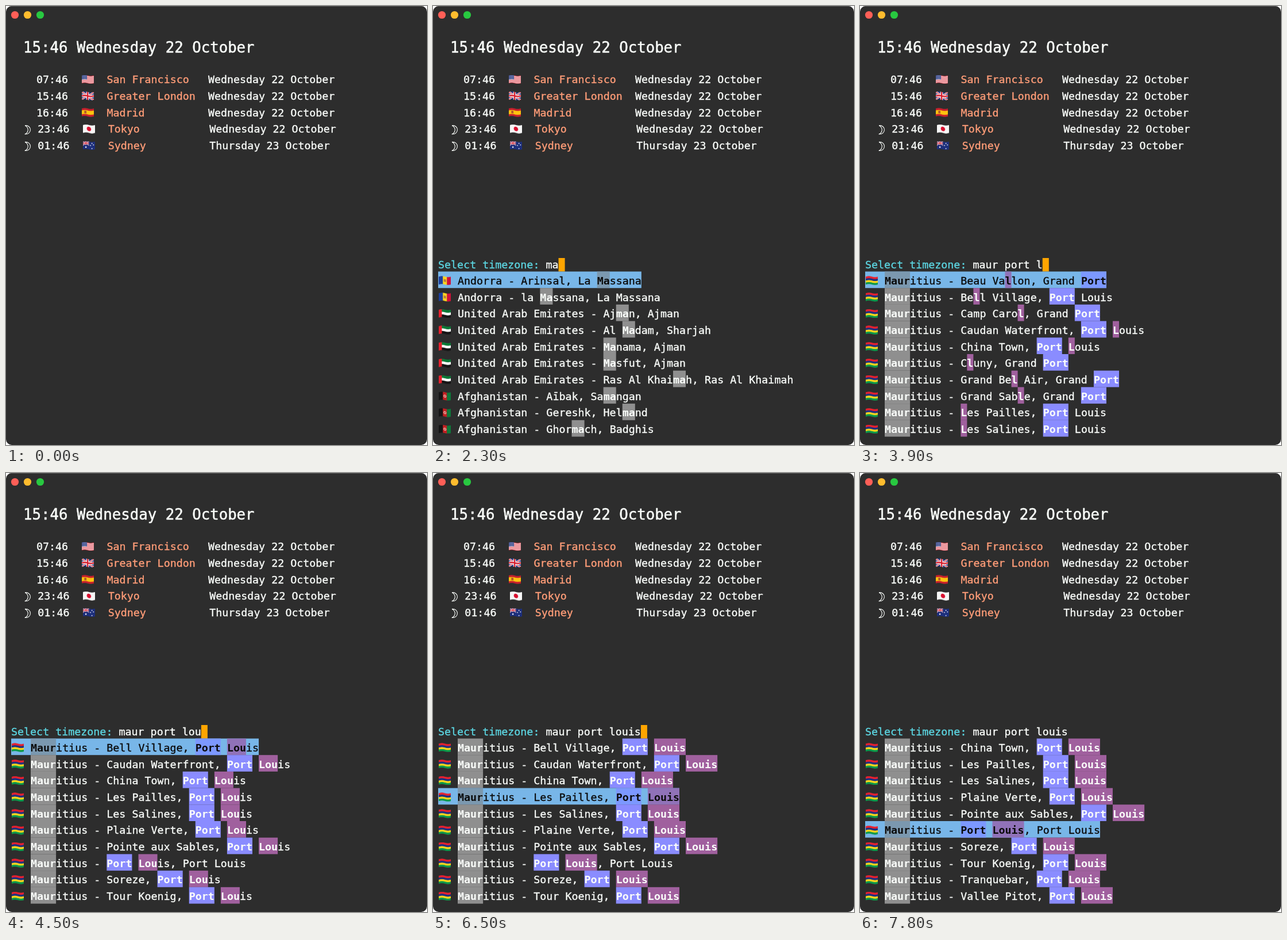
Write an HTML page with a canvas that moves like this. It is 733 px wide and 763 px high and loops after 8000 ms.

```html
<!DOCTYPE html>
<html lang="en">
<head>
<meta charset="utf-8">
<title>World clock</title>
<style>
  html, body { margin: 0; width: 100%; height: 100%; overflow: hidden; background: #fff; }
  canvas { display: block; width: 733px; height: 763px; }
</style>
</head>
<body>
<canvas id="stage"></canvas>
<script>
const W = 733, H = 763, LOOP = 8000;
const SIZE = 18.32, CELL = SIZE * 0.602, LINE = 28.7, ROWS = 10;
const LEFT = 9, TEXT_X = 43, LIST_Y = 461.5;
const FONT = '"DejaVu Sans Mono", "Noto Sans Mono", monospace';
const INK = '#fafdfa', CITY = '#ff9d78', PROMPT = '#5cd6e2';
const SELECTED = '#78b6e8', CURSOR = '#ffa500';
const MARK = ['#8f8f8f', '#8a8cff', '#a0609e'];
const MARK_SELECTED = ['#7b98af', '#7c98ff', '#9072b8'];
const LABEL = 'Select timezone: ';

const canvas = document.getElementById('stage');
const ctx = canvas.getContext('2d');
const ratio = window.devicePixelRatio || 1;
canvas.width = W * ratio;
canvas.height = H * ratio;

// Flags are painted on a 20 x 13 grid, then waved column by column.
const FW = 20, FH = 13, ZOOM = 4, FLAG_WIDTH = 21;

function box(g, color, x, y, w, h) {
  g.fillStyle = color;
  g.fillRect(x, y, w, h);
}
function disc(g, color, x, y, r) {
  g.fillStyle = color;
  g.beginPath();
  g.arc(x, y, r, 0, Math.PI * 2);
  g.fill();
}
function shape(g, color, points) {
  g.fillStyle = color;
  g.beginPath();
  points.forEach(([x, y]) => g.lineTo(x, y));
  g.fill();
}
function bars(g, ...colors) {
  const h = FH / colors.length;
  colors.forEach((c, i) => box(g, c, 0, i * h, FW, h));
}
function columns(g, ...colors) {
  const w = FW / colors.length;
  colors.forEach((c, i) => box(g, c, i * w, 0, w, FH));
}
function saltire(g, color, width) {
  g.strokeStyle = color;
  g.lineWidth = width;
  g.beginPath();
  g.moveTo(0, 0); g.lineTo(FW, FH);
  g.moveTo(FW, 0); g.lineTo(0, FH);
  g.stroke();
}
function union(g) {
  box(g, '#1d2f7c', 0, 0, FW, FH);
  saltire(g, '#fff', 2.8);
  saltire(g, '#d6202f', 1);
  for (const [color, w] of [['#fff', 4.4], ['#d6202f', 2.4]]) {
    box(g, color, 0, (FH - w) / 2, FW, w);
    box(g, color, (FW - w) / 2, 0, w, FH);
  }
}

const FLAGS = {
  us(g) {
    for (let i = 0; i < 13; i++) box(g, i % 2 ? '#fff' : '#d8323f', 0, i, FW, 1);
    box(g, '#3a4a8c', 0, 0, 9, 7);
    for (let i = 0; i < 12; i++) disc(g, '#fff', 1.4 + i % 4 * 2.1, 1.4 + (i >> 2) * 2.1, 0.45);
  },
  gb: union,
  es(g) {
    bars(g, '#c8202c', '#fcc40f', '#fcc40f', '#c8202c');
    box(g, '#b0562a', 4.5, 4.4, 3.6, 4.2);
  },
  jp(g) { bars(g, '#f6f6f6'); disc(g, '#d8102f', 10, 6.5, 3.6); },
  au(g) {
    bars(g, '#1d2f7c');
    g.save(); g.scale(0.5, 0.5); union(g); g.restore();
    disc(g, '#fff', 5, 10, 1.2);
    [[15, 2.3], [15, 10.8], [12.6, 6], [17.5, 5]].forEach(([x, y]) => disc(g, '#fff', x, y, 0.8));
  },
  ad(g) {
    columns(g, '#1c3f9e', '#fcd420', '#d0123a');
    box(g, '#b9763f', 8.2, 4.3, 3.6, 4.4);
  },
  ae(g) { bars(g, '#0a7a36', '#fff', '#151515'); box(g, '#e8202c', 0, 0, 5, FH); },
  af(g) {
    columns(g, '#151515', '#c41f22', '#0d7a3a');
    disc(g, '#e6bcae', 10, 6.5, 2.4);
    disc(g, '#c41f22', 10, 6.5, 1.1);
  },
  at(g) { bars(g, '#e0283a', '#fff', '#e0283a'); },
  br(g) {
    bars(g, '#129a43');
    shape(g, '#fedd18', [[1.6, 6.5], [10, 1], [18.4, 6.5], [10, 12]]);
    disc(g, '#24479a', 10, 6.5, 2.7);
    box(g, '#dfe8ee', 7.6, 6, 4.8, 0.8);
  },
  ca(g) {
    columns(g, '#ea1c24', '#fff', '#fff', '#ea1c24');
    shape(g, '#ea1c24', [[10, 2], [11.2, 4.3], [12, 4], [11.9, 6], [14, 5.3], [13.6, 7.2],
      [11.6, 9], [10.3, 9], [10.3, 11], [9.7, 11], [9.7, 9], [8.4, 9], [6.4, 7.2], [6, 5.3],
      [8.1, 6], [8, 4], [8.8, 4.3]]);
  },
  ch(g) {
    box(g, '#e81c24', 3.5, 0, 13, FH);
    box(g, '#fff', 6.2, 5.2, 7.6, 2.6);
    box(g, '#fff', 8.7, 2.7, 2.6, 7.6);
  },
  fr(g) { columns(g, '#1c3f9e', '#fff', '#e0283a'); },
  it(g) { columns(g, '#0d9246', '#fff', '#d0283a'); },
  mu(g) { bars(g, '#e8202f', '#1e3182', '#fdd61c', '#0b9a4a'); }
};
const flagCache = {};

function flagImage(code) {
  if (!flagCache[code]) {
    const flat = document.createElement('canvas');
    flat.width = FW * ZOOM;
    flat.height = FH * ZOOM;
    const g = flat.getContext('2d');
    g.scale(ZOOM, ZOOM);
    FLAGS[code](g);

    const waved = document.createElement('canvas');
    const margin = ZOOM;
    waved.width = flat.width;
    waved.height = flat.height + 2 * margin;
    const wg = waved.getContext('2d');
    for (let x = 0; x < flat.width; x++) {
      const dy = -0.8 * ZOOM * Math.sin(x / flat.width * Math.PI * 2);
      wg.drawImage(flat, x, 0, 1, flat.height, x, margin + dy, 1, flat.height);
    }
    flagCache[code] = waved;
  }
  return flagCache[code];
}

function drawFlag(code, x, mid) {
  const image = flagImage(code);
  const h = image.height / image.width * FLAG_WIDTH;
  ctx.imageSmoothingQuality = 'high';
  ctx.drawImage(image, x, mid - h / 2, FLAG_WIDTH, h);
}

const ARA = ', Auvergne-Rhône-Alpes';
const GP = ', Grand Port', PL = ', Port Louis';
const COUNTRIES = [
  ['ad', 'Andorra', ['Andorra la Vella, Andorra la Vella', 'Arinsal, La Massana',
    'Canillo, Canillo', 'El Tarter, Canillo', 'Encamp, Encamp', 'la Massana, La Massana',
    'les Escaldes, Escaldes-Engordany', 'Ordino, Ordino', 'Pas de la Casa, Encamp',
    'Sant Julià de Lòria, Sant Julià de Loria']],
  ['ae', 'United Arab Emirates', ['Abu Dhabi, Abu Dhabi', 'Ajman, Ajman', 'Al Ain, Abu Dhabi',
    'Al Fujairah City, Fujairah', 'Al Madam, Sharjah', 'Ar Ruways, Abu Dhabi',
    'Dibba Al-Fujairah, Fujairah', 'Manama, Ajman', 'Masfut, Ajman',
    'Ras Al Khaimah, Ras Al Khaimah']],
  ['af', 'Afghanistan', ['Aībak, Samangan', 'Gereshk, Helmand', 'Ghormach, Badghis']],
  ['at', 'Austria', ['Mauer bei Amstetten, Lower Austria', 'Mauerbach, Lower Austria',
    'Mauerkirchen, Upper Austria', 'Maurach, Tyrol', 'Mautern, Lower Austria',
    'Mautern in Steiermark, Styria', 'Mauthausen, Upper Austria', 'Mauthen, Carinthia']],
  ['br', 'Brazil', ['Doutor Maurício Cardoso, Rio Grande do Sul',
    'Maurilândia do Tocantins, Tocantins', 'Maurilândia, Goiás', 'Mauriti, Ceará']],
  ['ca', 'Canada', ['Mauricie, Quebec', 'Saint-Augustin-de-Desmaures, Quebec']],
  ['ch', 'Switzerland', ['Mauraz, Vaud', 'Saint-Maurice District, Valais',
    'Saint-Maurice, Valais']],
  ['fr', 'France', ['Maurepas, Île-de-France', 'Mauriac' + ARA, 'Maurs' + ARA,
    'Saint-Maurice-de-Beynost' + ARA, 'Saint-Maurice-de-Lignon' + ARA,
    'Saint-Maurice-en-Gourgois' + ARA, "Saint-Maurice-l'Exil" + ARA,
    'Saint-Maurice-sur-Dargoire' + ARA]],
  ['it', 'Italy', ['San Maurizio Canavese, Piedmont', "San Maurizio d'Opaglio, Piedmont"]],
  ['mu', 'Mauritius', ['Bambous Virieux' + GP, 'Beau Vallon' + GP, 'Bell Village' + PL,
    'Bois des Amourettes' + GP, 'Camp Carol' + GP, 'Caudan Waterfront' + PL, 'China Town' + PL,
    'Cluny' + GP, 'Deux Frères' + GP, 'Grand Bel Air' + GP, 'Grand Sable' + GP,
    'Les Pailles' + PL, 'Les Salines' + PL, 'Plaine Verte' + PL, 'Pointe aux Sables' + PL,
    'Port Louis' + PL, 'Soreze' + PL, 'Tour Koenig' + PL, 'Tranquebar' + PL,
    'Vallee Pitot' + PL]]
];
const PLACES = COUNTRIES.flatMap(([flag, country, names]) =>
  names.map(name => ({ flag, text: country + ' - ' + name })));

// Key presses: [time, query, selected entry]
const KEYS = [
  [1100, '', 0], [2200, 'm', 0], [2300, 'ma', 0], [2400, 'mau', 0], [2600, 'maur', 0],
  [3200, 'maur ', 0], [3400, 'maur p', 0], [3500, 'maur po', 0], [3600, 'maur port', 0],
  [3800, 'maur port ', 0], [3900, 'maur port l', 0], [4200, 'maur port lo', 0],
  [4500, 'maur port lou', 0], [4900, 'maur port loui', 0], [5000, 'maur port louis', 0],
  [6100, 'maur port louis', 1], [6300, 'maur port louis', 2], [6500, 'maur port louis', 3],
  [6800, 'maur port louis', 4], [6900, 'maur port louis', 5], [7100, 'maur port louis', 6],
  [7300, 'maur port louis', 7]
];
const LAST_SELECTABLE_ROW = 5;
const BLINK = 500;

const CLOCKS = [
  ['07:46', 'us', 'San Francisco', 'Wednesday 22 October'],
  ['15:46', 'gb', 'Greater London', 'Wednesday 22 October'],
  ['16:46', 'es', 'Madrid', 'Wednesday 22 October'],
  ['23:46', 'jp', 'Tokyo', 'Wednesday 22 October', true],
  ['01:46', 'au', 'Sydney', 'Thursday 23 October', true]
];

// Regular text gets a hairline outline for a medium weight.
function write(text, x, mid, color = INK, weight = 'normal', size = SIZE) {
  const y = mid + size * 0.365;
  ctx.font = `${weight} ${size}px ${FONT}`;
  ctx.fillStyle = ctx.strokeStyle = color;
  ctx.fillText(text, x, y);
  if (weight === 'normal') {
    ctx.lineWidth = size * 0.02;
    ctx.lineJoin = 'round';
    ctx.strokeText(text, x, y);
  }
}

function drawMoon(mid) {
  ctx.strokeStyle = INK;
  ctx.lineWidth = 1.1;
  ctx.beginPath();
  ctx.moveTo(33, mid - 6);
  ctx.bezierCurveTo(45.5, mid - 7, 45.5, mid + 10, 33, mid + 9);
  ctx.bezierCurveTo(40, mid + 5.5, 40, mid - 2.5, 33, mid - 6);
  ctx.stroke();
}

function drawWindow() {
  ctx.fillStyle = '#2d2d2d';
  ctx.beginPath();
  ctx.roundRect(0, 0, W, H, 10);
  ctx.fill();
  box(ctx, '#565656', 9, 0, W - 18, 1);
  ['#ff5f57', '#febc2e', '#28c840'].forEach((c, i) => disc(ctx, c, 15.5 + 22 * i, 15.5, 6.6));
}

function drawClocks() {
  write('15:46 Wednesday 22 October', 30, 71.6, INK, 'normal', SIZE * 1.405);
  CLOCKS.forEach(([time, flag, city, date, night], i) => {
    const mid = 127.6 + i * LINE, shift = night ? 2.3 : 0;
    if (night) drawMoon(mid);
    write(time, 53 + shift, mid);
    drawFlag(flag, 131.6 + shift, mid);
    write(city, 175.4 + shift, mid, CITY);
    write(date, 351.9 + shift, mid);
  });
}

function drawEntry({ flag, text }, row, terms, selected) {
  const top = LIST_Y + row * LINE, mid = top + 15.7;
  const xAt = i => TEXT_X + i * CELL;
  const lower = text.toLowerCase();
  const marks = terms
    .map((term, id) => ({ id, from: lower.indexOf(term), size: term.length }))
    .sort((a, b) => a.from - b.from);
  const ink = selected ? '#0b0b0b' : INK;

  if (selected) box(ctx, SELECTED, LEFT, top, xAt(text.length) - LEFT, LINE);
  drawFlag(flag, 10.2, mid);
  let done = 0;
  for (const { id, from, size } of marks) {
    write(text.slice(done, from), xAt(done), mid, ink);
    box(ctx, (selected ? MARK_SELECTED : MARK)[id], xAt(from), top, size * CELL, LINE);
    write(text.slice(from, from + size), xAt(from), mid, ink, 'bold');
    done = from + size;
  }
  write(text.slice(done), xAt(done), mid, ink);
}

function drawPicker(t) {
  const [pressed, query, selected] = KEYS.filter(k => k[0] <= t).pop();
  const terms = query.split(' ').filter(Boolean);
  const scroll = Math.max(0, selected - LAST_SELECTABLE_ROW);

  write(LABEL, LEFT, 449.8, PROMPT);
  const queryX = LEFT + LABEL.length * CELL;
  write(query, queryX, 449.8);
  if (Math.floor((t - pressed) / BLINK) % 2 === 0) {
    box(ctx, CURSOR, queryX + query.length * CELL, 438, CELL, 23.5);
  }
  PLACES
    .filter(p => terms.every(term => p.text.toLowerCase().includes(term)))
    .slice(scroll, scroll + ROWS)
    .forEach((p, row) => drawEntry(p, row, terms, row + scroll === selected));
}

function draw(t) {
  ctx.setTransform(ratio, 0, 0, ratio, 0, 0);
  ctx.clearRect(0, 0, W, H);
  drawWindow();
  drawClocks();
  if (t >= KEYS[0][0]) drawPicker(t);
  else if (t >= 200) write('Loading ...', LEFT, 750);
}

function tick() {
  draw(performance.now() % LOOP);
  requestAnimationFrame(tick);
}
tick();
</script>
</body>
</html>
```
